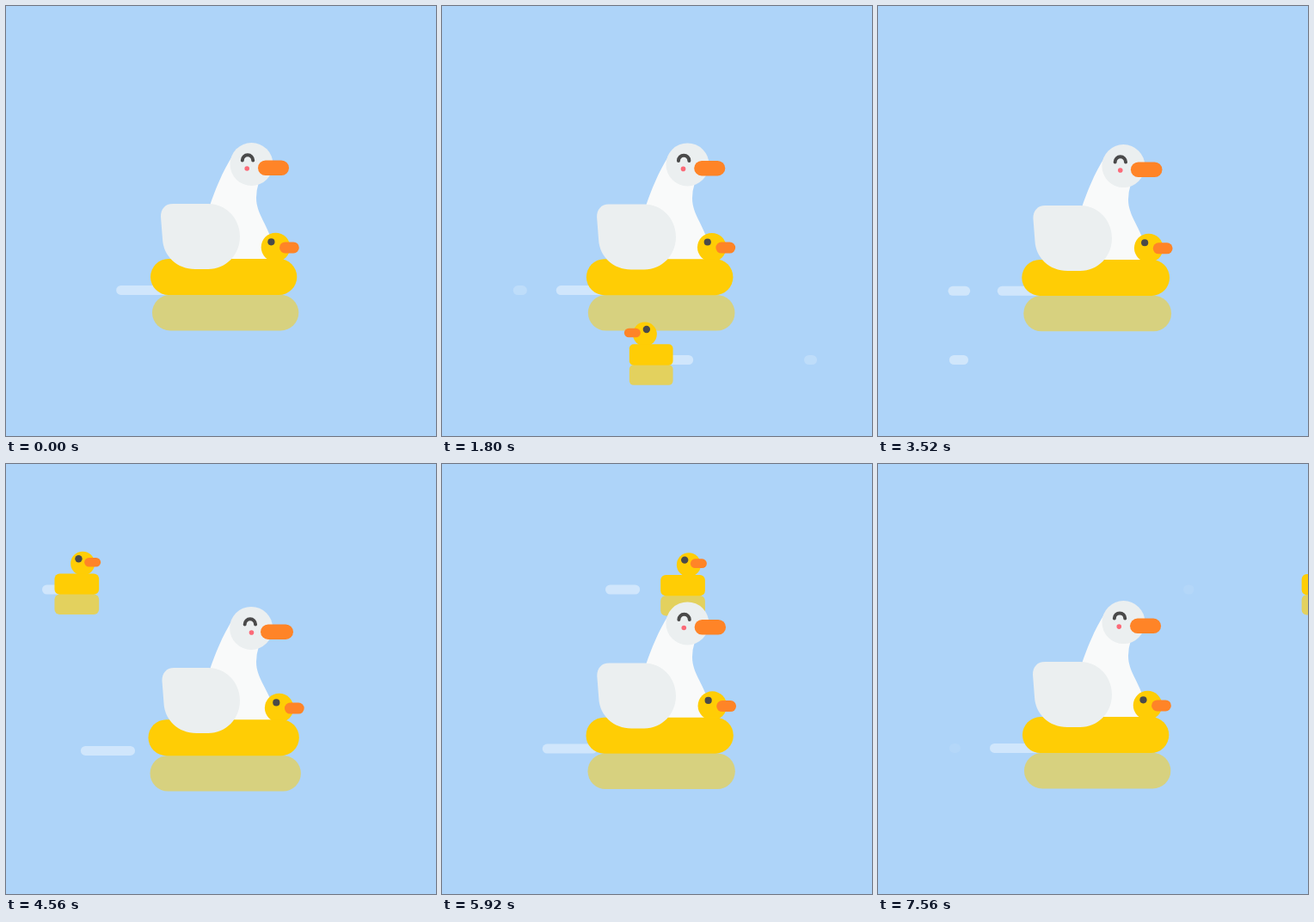
Write an HTML page with a canvas that moves like this. It is 500 px wide and 500 px high and loops after 7600 ms.

```html
<!DOCTYPE html>
<html lang="en">
<head>
<meta charset="utf-8">
<title>Ducks on the water</title>
<style>
html, body { margin: 0; width: 100%; height: 100%; overflow: hidden; background: #aed4f9; }
canvas { display: block; width: 100%; height: 100%; }
</style>
</head>
<body>
<canvas id="stage" width="500" height="500"></canvas>
<script>
const ctx = document.getElementById('stage').getContext('2d');
const LOOP = 7600, CYCLE = 1900, HALF = CYCLE / 2;
const C = {
  water: '#aed4f9', yellow: '#ffcd05', orange: '#ff8427', dark: '#4a4a4a',
  white: '#f9fafa', grey: '#ebeff0', cheek: '#fb6a78',
  ringShade: '#d7d17f', duckShade: '#e3d15e'
};

const clamp = (v, a, b) => Math.min(b, Math.max(a, v));

// piecewise linear track of [time, value] pairs
function track(keys, t) {
  for (let i = 1; i < keys.length; i++) {
    const [t0, v0] = keys[i - 1], [t1, v1] = keys[i];
    if (t <= t1) return v0 + (v1 - v0) * (t - t0) / (t1 - t0);
  }
  return keys[keys.length - 1][1];
}

function box(x0, y0, x1, y1, r, color) {
  ctx.fillStyle = color;
  ctx.beginPath();
  ctx.roundRect(Math.min(x0, x1), y0, Math.abs(x1 - x0), y1 - y0, r);
  ctx.fill();
}

function disc(x, y, r, color, ry = r) {
  ctx.fillStyle = color;
  ctx.beginPath();
  ctx.ellipse(x, y, r, ry, 0, 0, Math.PI * 2);
  ctx.fill();
}

function ripple(x0, x1, y, left) {
  const alpha = 0.42 * clamp(left / 200, 0, 1);
  box(x0, y - 5.5, x1, y + 5.5, 5.5, `rgba(255,255,255,${alpha})`);
}

/* Small swimming ducks. `dir` is the heading, `front` the leading edge of the
   body at time `at`; each trail entry is [end time, place of its far end then]. */
const swimmers = {
  lower: {
    dir: -1, front: 389, at: 760, speed: 0.1644, len: 50.7, top: 393.8, wakeY: 411.5,
    head: 18, eye: 20, beak: -6, r: 5,
    trail: [[1900, 434.3], [2850, 274], [3800, 100.2]]
  },
  upper: {
    dir: 1, front: 108, at: 4560, speed: 0.1454, len: 51.7, top: 128.2, wakeY: 146,
    head: 19, eye: 23.7, beak: -2, r: 6,
    trail: [[5700, 61.7], [6650, 202.6], [7600, 355.7]]
  }
};

function swimmer(s, t) {
  const front = s.front + s.dir * s.speed * (t - s.at);
  const rear = front - s.dir * s.len;
  if (s === swimmers.upper && t < LOOP / 2) return;

  for (const [end, place] of s.trail) {
    const left = end - t;
    if (left < 0) continue;
    const far = place - s.dir * 0.0173 * left;
    const gap = (rear - far) * s.dir;
    if (gap <= 0) continue;
    const size = Math.min(11 + 0.04 * left, gap + 20);
    ripple(far, far + s.dir * size, s.wakeY, left);
  }

  const y = s.top + 0.75 * Math.sin(2 * Math.PI * t / HALF);
  const at = d => front - s.dir * d;
  box(rear, y + 24, front, y + 47.5, s.r, C.duckShade);
  disc(at(s.head), y - 11.8, 14, C.yellow);
  box(rear, y, front, y + 24.3, s.r, C.yellow);
  disc(at(s.eye), y - 17.3, 4.2, C.dark);
  box(at(s.beak), y - 18.6, at(s.beak + 19), y - 8, 5.3, C.orange);
}

const TIP = [[0, 178], [670, 139.8], [850, 133], [950, 128.2], [1170, 117.6], [1710, 91.7], [1900, 83]];

function bigWake(p, b, sx) {
  for (const age of [p - HALF, p + HALF]) {
    if (age < 0) continue;
    const left = HALF * 3 - age;
    ripple(sx(track(TIP, age)), sx(94 + 0.0518 * left), 330.4 + 3.3 * b, left);
  }
}

function neck(dy) {
  ctx.fillStyle = C.white;
  ctx.beginPath();
  ctx.moveTo(264, 173 + dy);
  ctx.bezierCurveTo(251, 194 + dy, 244, 212 + dy, 237, 232 + dy);
  ctx.lineTo(237, 304);
  ctx.lineTo(312, 304);
  ctx.lineTo(312, 284 + dy / 2);
  ctx.bezierCurveTo(306, 255 + dy, 291, 243 + dy, 291, 223 + dy);
  ctx.quadraticCurveTo(291, 214 + dy, 294, 205 + dy);
  ctx.closePath();
  ctx.fill();
}

function wing(dx, dy) {
  ctx.save();
  ctx.translate(180 + dx, 230 + dy);
  const w = 92 - dx;
  ctx.fillStyle = C.grey;
  ctx.beginPath();
  ctx.moveTo(14, 0);
  ctx.lineTo(w - 37, 0);
  ctx.bezierCurveTo(w - 16, 0, w, 17, w, 38);
  ctx.bezierCurveTo(w, 59, w - 16, 76, w - 37, 76);
  ctx.lineTo(40, 76);
  ctx.bezierCurveTo(19, 76, 3, 61, 2, 41);
  ctx.lineTo(0, 15);
  ctx.bezierCurveTo(0, 6, 5, 0, 14, 0);
  ctx.fill();
  ctx.restore();
}

function bigDuck(t) {
  const p = t % CYCLE;
  const b = Math.pow(Math.abs(Math.sin(Math.PI * p / CYCLE)), 1.6);
  const dy = 7.5 * b, low = 3.4 * b;
  const sx = x => 253.2 + (x - 253.2) * (1 + 0.032 * b);

  bigWake(p, b, sx);
  box(sx(170), 335.8 + low, sx(340.3), 377.4 + low, 20.8, C.ringShade);

  neck(dy);
  disc(285.5 - 0.4 * b, 184 + dy, 25, C.grey);

  // face
  const ex = 281 + 3.1 * b, ey = 179.5 + dy;
  ctx.strokeStyle = C.dark;
  ctx.lineWidth = 4;
  ctx.lineCap = 'round';
  ctx.beginPath();
  ctx.arc(ex, ey, 6.2, Math.PI, 0);
  ctx.stroke();
  disc(280.2 + 5.7 * b, 189 + dy, 2.8, C.cheek);
  box(293 + 3.3 * b, 179.5 + dy, 329 + 5.4 * b, 197 + dy, 8.75, C.orange);

  // duckling
  const bx = 4.5 * b, fx = 6.4 * b;
  disc(313.5 + bx, 280.5 + low, 16.8, C.yellow);
  disc(308.4 + fx, 274.3 + low, 4.1, C.dark);
  box(318 + fx, 274.4 + low, 340.8 + fx, 287.4 + low, 6.5, C.orange);

  box(sx(168), 294 + low, sx(338.3), 336 + low, 21, C.yellow);
  wing(1.6 * b, dy);
}

function draw(t) {
  ctx.fillStyle = C.water;
  ctx.fillRect(0, 0, 500, 500);
  swimmer(swimmers.upper, t);
  bigDuck(t);
  swimmer(swimmers.lower, t);
}

const start = performance.now();
function frame() {
  draw((performance.now() - start) % LOOP);
  requestAnimationFrame(frame);
}
frame();
</script>
</body>
</html>
```
